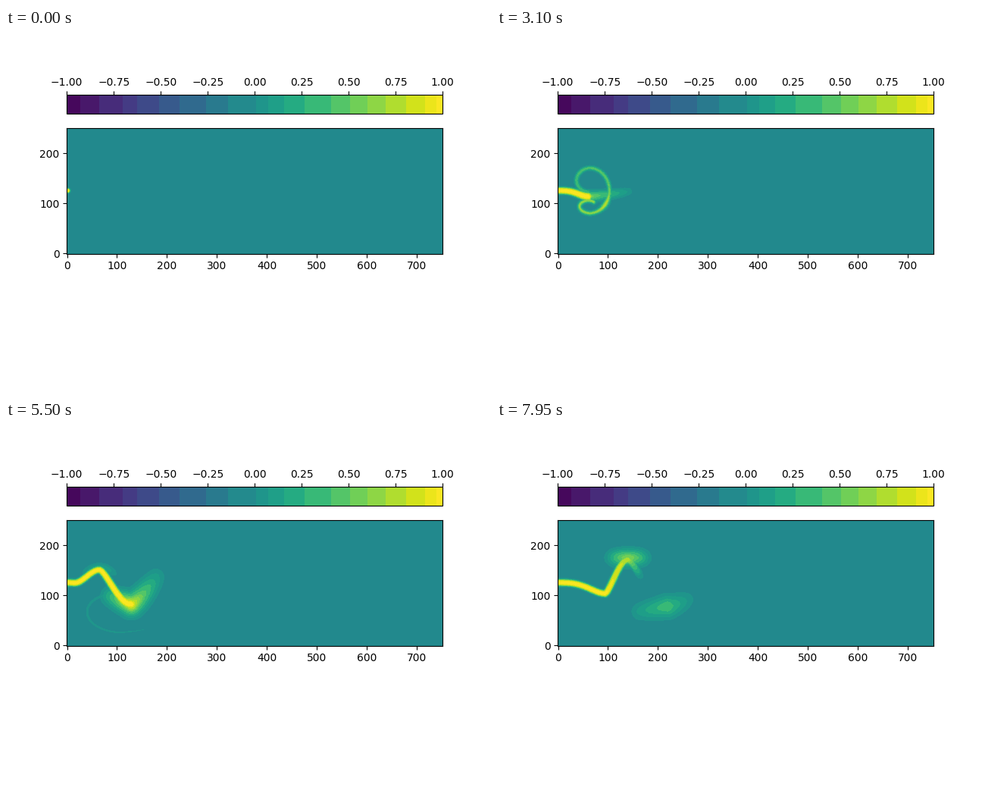
Write a matplotlib script that moves like this. It is 640 by 480 pixels and loops after 8 s.

```python
import numpy as np
import matplotlib.pyplot as plt
from matplotlib.animation import FuncAnimation
from matplotlib.colors import ListedColormap

H, W = 252, 752
MID = 125.6
STEP = 50
FRAMES = 160
FLOOR = 0.03
BURST = 2.4         # the cap starts to swell into a ring
BANDS = [0, 9, 22, 38, 48, 63, 77, 95, 110, 129, 137,
         148, 162, 180, 193, 205, 217, 231, 244, 252, 256]


def ramp(t, start, length):
    """Smoothstep from 0 to 1."""
    u = np.clip((t - start) / length, 0, 1)
    return u * u * (3 - 2 * u)


def mix(a, b, f):
    return a + (b - a) * f


def stroke(x, y, w, v):
    return np.column_stack(np.broadcast_arrays(x, y, np.maximum(w, 0.3),
                                               np.clip(v, 0, 1)))


# Bends of the stem drift downstream while their swing grows
def trough(t):
    grow = 2 + 64 * (1 - np.exp(-t / 1.3))
    return (max(grow, 62 + 37 * (t - 3.7)),
            MID - 48 * np.tanh(max(t - 2.6, 0) / 2))


def crest(t):
    s = max(t - 3.7, 0)
    return 38.5 * s - 1.3 * s**2, MID + 46 * (1 - np.exp(-(s / 2)**2))


def dip(t):
    s = max(t - 5, 0)
    return 32 * s, MID - 2.5 * s**2


def stem(t):
    knots = [(0, MID), dip(t), crest(t), trough(t)]
    link = 1 - ramp(t, 5.7, 0.8)
    u = np.linspace(0, 1, 17)
    base = 4.6 + 2.2 * min(t / 1.7, 1)
    strength = [1 + 0 * u, 1 - 0.25 * (1 - link) * u,
                np.maximum(link, 0.75 - 2.2 * u)]
    parts = []
    for i, ((xa, ya), (xb, yb)) in enumerate(zip(knots, knots[1:])):
        if xb <= xa:
            continue
        lean = 0.8 + 0.8 * np.exp(-xa / 10)
        swell = 3 * u**2 * ramp(t, 2.6, 1) * (i == 2)
        parts.append(stroke(mix(xa, xb, u), mix(ya, yb, ramp(u**lean, 0, 1)),
                            base + swell, strength[i]))
    return np.vstack(parts)


def ring_half(t, side):
    """Front quarter ellipse followed by a curl; side is 1 above, -1 below."""
    g = max(t - BURST, 0)
    e = min(g / 1.3, 1)
    early = min(t / BURST, 1)
    front = 69 * early**0.72 + 50 * g + 4.4 * g**2
    high = 25 * early**0.43 + 30 * g - 2 * g**2
    xc = (0.66 - 0.09 * g) * front
    if side > 0:
        rx, ry = mix(0.17 * front, xc - 24, e), mix(0.3, 0.85, e) * high
        sweep, shrink = mix(270, 90, e), mix(0.5, 0, e)
    else:
        rx, ry = mix(0.17, 0.27, e) * front, (0.3 + 0.05 * g) * high
        sweep, shrink = mix(270, 170, e), mix(0.5, 0.3, e)

    q = np.linspace(0, 1, 24)
    a, b = q * np.pi / 2, np.pi / 2 + q * np.radians(sweep)
    k = 1 - shrink * q
    x = np.r_[xc + (front - 3 - xc) * np.cos(a), xc + rx * k * np.cos(b)]
    y = np.r_[high * np.sin(a), high - ry + ry * k * np.sin(b)]
    s = np.linspace(0, 1, len(x))

    below = side < 0
    lobe = below * np.exp(-((s - 0.2) / 0.12)**2 - ((g - 1.3) / 0.6)**2)
    fade = np.exp(-0.8 * g) * (1 + 1.5 * below * e * s)
    v = fade * (1 - 0.65 * s * (1 - e)) - 0.03 * g + 0.5 * lobe
    w = np.maximum(4.2 * early**0.4 - 0.7 * g, 2.4) + 3.5 * lobe
    return stroke(x, MID + side * y, w, v)


def cloud(t, side):
    """One arm of the soft cloud around the trough."""
    x, y = trough(t)
    u = np.linspace(0, 1, 12)
    core = 0.95 * min(1, np.exp(-0.38 * (t - 5.6))) * ramp(t, 2.6, 0.8)
    w = (9 + 9 * ramp(t, 3.4, 2)) * (1 - 0.12 * u)
    if side > 0:
        reach = 40 + 28 * np.exp(-(t - 3.7) / 1.6)
        rise = 54 * np.exp(-((t - 5.7) / 2)**2)
        return stroke(x + reach * u, y + rise * u**1.3, w,
                      core * (1 - 0.87 * u**0.8))
    reach = 55 * ramp(t, 4.2, 2)
    rise = 22 - 13 * (t - 5.5)
    return stroke(x - reach * u, y + rise * u * reach / 55, w,
                  core * (1 - 0.7 * u))


def hood(t):
    """Soft cover over the crest."""
    x, y = crest(t)
    u = np.linspace(-1, 1, 15)
    return stroke(x + 31 * u, y + 4 - 12 * u**2 * (1 - ramp(t, 6.4, 1.5)),
                  8 + 6 * ramp(t, 5.5, 2),
                  0.6 * ramp(t, 5, 1.4) * (1 - 0.75 * u**2))


def stamp(field, a, b, power):
    """Blend one soft capsule into the field by maximum."""
    if max(a[3], b[3]) <= FLOOR:
        return
    r = 2.2 * max(a[2], b[2])
    x0, x1 = max(int(min(a[0], b[0]) - r), 0), min(int(max(a[0], b[0]) + r) + 2, W)
    y0, y1 = max(int(min(a[1], b[1]) - r), 0), min(int(max(a[1], b[1]) + r) + 2, H)
    if x0 >= x1 or y0 >= y1:
        return
    dx, dy = b[0] - a[0], b[1] - a[1]
    gx = np.arange(x0, x1)[None, :] - a[0]
    gy = np.arange(y0, y1)[:, None] - a[1]
    u = np.clip((gx * dx + gy * dy) / (dx * dx + dy * dy + 1e-9), 0, 1)
    d2 = (gx - u * dx)**2 + (gy - u * dy)**2
    w, v = mix(a[2], b[2], u), mix(a[3], b[3], u)
    glow = v * np.exp(-(d2 / w**2)**(power / 2)) * (1 + FLOOR) - FLOOR
    part = field[y0:y1, x0:x1]
    np.maximum(part, glow, out=part)


def field_at(t):
    field = np.zeros((H, W))
    layers = [(cloud(t, 1), 2), (cloud(t, -1), 2), (hood(t), 2),
              (ring_half(t, 1), 2), (ring_half(t, -1), 2), (stem(t), 4)]
    for pts, power in layers:
        for a, b in zip(pts[:-1], pts[1:]):
            stamp(field, a, b, power)
    return field


def banded(edges):
    base = plt.get_cmap("viridis")
    colors = np.empty((256, 4))
    for lo, hi in zip(edges[:-1], edges[1:]):
        colors[lo:hi] = base(int(mix(lo, hi, 0.6)))
    return ListedColormap(colors)


fig, ax = plt.subplots(figsize=(6.4, 4.8), dpi=100)
fig.subplots_adjust(left=0.1253, right=0.9003)
im = ax.imshow(field_at(0), origin="lower", cmap=banded(BANDS), vmin=-1, vmax=1)
fig.colorbar(im, ax=ax, location="top")


def update(i):
    im.set_data(field_at(i * STEP / 1000))
    return [im]


anim = FuncAnimation(fig, update, frames=FRAMES, interval=STEP,
                     repeat=True, repeat_delay=0)
plt.show()
```
